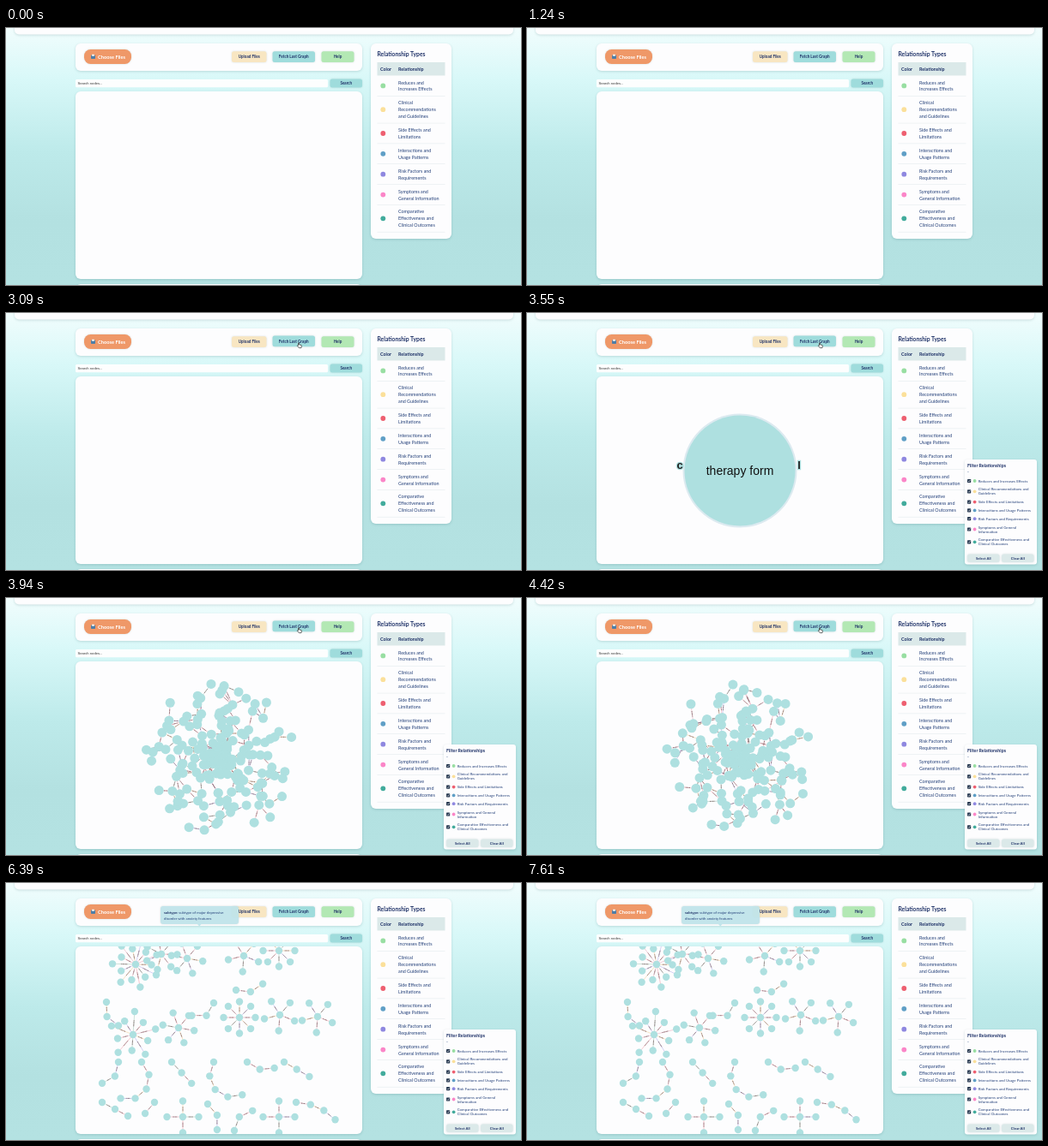
Write an HTML page that moves like this. It is 600 by 300 pixels and loops after 7640 ms.

```html
<!DOCTYPE html>
<html lang="en">
<head>
<meta charset="utf-8">
<title>Therapy graph</title>
<style>
  html, body { margin: 0; width: 100%; height: 100%; overflow: hidden; }
  svg { display: block; font-family: Lato, sans-serif; fill: #24407a; }
  .card { fill: #fdfdfe; filter: drop-shadow(0 1px 1.5px rgba(0, 60, 70, .16)); }
  .button { filter: drop-shadow(0 .5px .8px rgba(0, 60, 70, .15)); }
  .bold { font-weight: 700; fill: #1f3268; }
  .mid { text-anchor: middle; }
  .plain { font-family: "Liberation Sans", Arial, sans-serif; }
</style>
</head>
<body>
<svg id="stage" width="600" height="300" viewBox="0 0 600 300"></svg>
<script>
const LOOP = 7640;
const TEAL = '#aee0e0';
const types = [
  ['#98dea2', ['Reduces and', 'Increases Effects']],
  ['#fbe09a', ['Clinical', 'Recommendations', 'and Guidelines']],
  ['#ee5f70', ['Side Effects and', 'Limitations']],
  ['#5f9fc6', ['Interactions and', 'Usage Patterns']],
  ['#8f88e0', ['Risk Factors and', 'Requirements']],
  ['#fb86c8', ['Symptoms and', 'General Information']],
  ['#42ab9c', ['Comparative', 'Effectiveness and', 'Clinical Outcomes']]
];
const filters = [
  ['Reduces and Increases Effects'],
  ['Clinical Recommendations and', 'Guidelines'],
  ['Side Effects and Limitations'],
  ['Interactions and Usage Patterns'],
  ['Risk Factors and Requirements'],
  ['Symptoms and General', 'Information'],
  ['Comparative Effectiveness and', 'Clinical Outcomes']
];

// Markup helpers; text is placed by the middle of its capitals.
const text = (x, y, size, str, attrs = '') =>
  `<text x="${x}" y="${y + size * .36}" font-size="${size}" ${attrs}>${str}</text>`;
const rect = (x, y, w, h, r, attrs) =>
  `<rect x="${x}" y="${y}" width="${w}" height="${h}" rx="${r}" ${attrs}/>`;
const circle = (x, y, r, fill) => `<circle cx="${x}" cy="${y}" r="${r}" fill="${fill}"/>`;
const card = (x, y, w, h, r) => rect(x, y, w, h, r, 'class="card"');
const button = (x, y, w, h, fill, label, size) =>
  rect(x, y, w, h, 2.5, `class="button" fill="${fill}"`) +
  text(x + w / 2, y + h / 2, size, label, 'class="bold mid"');

function legend() {
  let out = card(425, 18, 94, 228, 6) +
    text(432.5, 30.3, 6.75, 'Relationship Types', 'class="bold"') +
    rect(432.5, 40, 79, 15.5, 0, 'fill="#dbe9e9"') +
    text(436, 47.7, 5.4, 'Color', 'class="bold"') +
    text(457, 47.7, 5.4, 'Relationship', 'class="bold"');
  let y = 55.5;
  for (const [color, lines] of types) {
    const h = 7.85 * lines.length + 8.15;
    out += circle(439.3, y + h / 2, 2.9, color);
    lines.forEach((line, i) => out += text(457, y + 8.1 + i * 7.9, 5.4, line));
    y += h;
    out += rect(432.5, y - .25, 79, .5, 0, 'fill="#dfe6e8"');
  }
  return out;
}

function filterPanel() {
  let out = card(510, 171, 84, 122.5, 3) +
    text(513, 177.9, 5.3, 'Filter Relationships', 'class="bold"') +
    text(513, 185.5, 5, '-');
  let y = 196;
  filters.forEach((lines, i) => {
    const mid = y + (lines.length - 1) * 2.5;
    out += rect(513, mid - 2.1, 4.2, 4.2, .7, 'fill="#24364e"') +
      `<path d="M514 ${mid}l.9 1 1.5-2" stroke="#fff" stroke-width=".6" fill="none"/>` +
      circle(521.6, mid, 1.9, types[i][0]);
    lines.forEach((line, k) => out += text(525.7, y + k * 5, 4.4, line));
    y += lines.length > 1 ? 14.8 : 9.8;
  });
  return out + button(513, 281.5, 37.5, 9.5, '#dbe9e9', 'Select All', 4.3) +
    button(553, 281.5, 37.5, 9.5, '#dbe9e9', 'Clear All', 4.3);
}

function seeded(seed) {
  return () => (seed = seed * 16807 % 2147483647) / 2147483647;
}
const polar = ([x, y], r, degrees) => {
  const a = degrees * Math.PI / 180;
  return [x + r * Math.cos(a), y + r * Math.sin(a)];
};

// An edge is a faint line with a tiny label in its middle.
const edgeColors = ['#ea7183', '#d9829b', '#e9b765', '#8f88e0', '#7fb39a'];
function edge([ax, ay], [bx, by], i) {
  const at = k => `${(ax + (bx - ax) * k).toFixed(1)} ${(ay + (by - ay) * k).toFixed(1)}`;
  return `<path d="M${at(0)}L${at(1)}" stroke="${edgeColors[i % 5]}" stroke-width=".5" opacity=".75"/>` +
    `<path d="M${at(.36)}L${at(.64)}" stroke="#7d6062" stroke-width=".9" stroke-dasharray="1 .5"/>`;
}
const drawGraph = (nodes, links, r) =>
  links.map(([a, b], i) => edge(nodes[a], nodes[b], i)).join('') +
  nodes.map(([x, y]) => circle(x.toFixed(2), y.toFixed(2), r, TEAL)).join('');

// Settling cluster: a loose golden-angle spiral, dense in the middle,
// where each node hangs on an inner one.
const random = seeded(91);
const spread = size => (random() - .5) * size;
const CENTER = [249, 187];
const cluster = Array.from({length: 185}, (_, i) => {
  const [x, y] = polar(CENTER, 90 * i / 185 + spread(10), i * 137.5 + spread(50));
  return [CENTER[0] + (x - CENTER[0]) * .95, y];
});
const drift = cluster.map(() => [spread(6), spread(6)]);
const clusterLinks = cluster.slice(1).map(([x, y], n) => {
  const gap = ([px, py]) => Math.abs(Math.hypot(px - x, py - y) - 18);
  const inner = cluster.slice(0, n + 1);
  return [n + 1, inner.reduce((best, p, i) => gap(p) < gap(inner[best]) ? i : best, 0)];
});

function clusterAt(ms) {
  const k = (ms - 3940) / 480;
  const nodes = cluster.map((p, i) =>
    p.map((v, axis) => v + k * (drift[i][axis] - .03 * (v - CENTER[axis]))));
  return drawGraph(nodes, clusterLinks, 5.5);
}

// Packed layout: stars and bending chains.
function packedGraph() {
  const nodes = [], links = [];
  const add = p => nodes.push(p) - 1;

  function star(x, y, leaves) {
    const hub = add([x, y]), first = leaves % 4 ? -50 : 0;
    for (let i = 0; i < leaves; i++) {
      const r = leaves > 8 && i % 2 ? 27 : 18.5;
      links.push([hub, add(polar([x, y], r, first + i * 360 / leaves))]);
    }
  }
  function chain(x, y, length, heading, turn) {
    let p = [x, y];
    for (let i = 0; i < length; i++) {
      const n = add(p);
      if (i) links.push([n - 1, n]);
      p = polar(p, 17, heading + i * turn);
    }
  }

  star(151, 95, 14);
  star(181, 83, 7);
  star(211, 88, 6);
  star(277, 85, 5);
  star(318, 79, 8);
  star(148, 177, 10);
  star(201, 169, 6);
  star(272, 157, 8);
  star(319, 154, 5);
  star(363, 156, 5);
  star(206, 273, 4);
  star(318, 273, 4);

  chain(117, 139, 3, 88, -50);
  chain(242, 140, 3, 120, 60);
  chain(268, 125, 3, 7, -40);
  chain(131, 209, 3, 104, 47);
  chain(158, 209, 5, 60, 40);
  chain(193, 209, 3, 47, 0);
  chain(242, 209, 5, 106, -38);
  chain(281, 209, 3, 30, -35);
  chain(324, 209, 3, 30, 0);
  chain(112, 256, 3, 28, 0);
  chain(173, 256, 2, 130, 0);
  chain(235, 258, 3, 50, 40);
  chain(266, 289, 3, -70, 45);
  chain(338, 256, 4, 9, 15);
  return drawGraph(nodes, links, 4.2);
}

const haloLetter = (s, x) => text(x, 177, 13, s,
  `class="plain mid" font-weight="700" fill="#222" stroke="${TEAL}" stroke-width="2.5" paint-order="stroke"`);
const firstNode = circle(248, 184, 66.5, '#dceaf0') + circle(248, 184, 64.5, TEAL) +
  text(248, 183.5, 14, 'therapy form', 'class="plain mid" fill="#111"') +
  haloLetter('c', 178) + haloLetter('l', 317);

const tooltip = rect(180, 27, 91, 21, 3, 'class="button" fill="#c0e4ea" opacity=".94"') +
  '<path d="M223 48h4.5l-2.25 2.5z" fill="#c0e4ea"/>' +
  text(184, 34.3, 4.25, '<tspan class="bold">subtype:</tspan> subtype of major depressive') +
  text(184, 41.3, 4.25, 'disorder with anxiety features');

const stage = document.getElementById('stage');
stage.innerHTML = `
  <defs>
    <linearGradient id="sky" x2="0" y2="1">
      <stop stop-color="#f1fdfd"/><stop offset=".2" stop-color="#d8f8f8"/>
      <stop offset=".48" stop-color="#bdeaea"/><stop offset=".75" stop-color="#b3e1e1"/>
      <stop offset="1" stop-color="#b4e2e2"/>
    </linearGradient>
    <clipPath id="frame">${rect(81, 74, 334, 219, 6, '')}</clipPath>
  </defs>
  ${rect(0, 0, 600, 300, 0, 'fill="url(#sky)"')}
  ${card(10, -20, 581, 27.5, 5)}
  ${text(308, -2.8, 6.2, 'Manage graph types, apply filters and query therapy pages by exploring groupings', 'class="mid" fill="#444"')}
  ${card(81, 18, 334, 32, 6)}
  ${rect(91, 25, 55, 17, 7.5, 'class="button" fill="#ef9868"')}
  ${rect(99, 31.5, 5, 4.5, .8, 'fill="#4d7ea8"')}${rect(100, 30.8, 3, 2, .3, 'fill="#f4efe6"')}
  ${text(107, 33.5, 5.7, 'Choose Files', 'font-weight="700" fill="#fff"')}
  ${button(263, 27.3, 40.5, 12.7, '#f8e6c2', 'Upload Files', 4.6)}
  <g id="fetch">${button(310.5, 27.3, 49.5, 12.7, '#9fdcdc', 'Fetch Last Graph', 4.65)}</g>
  ${button(367.5, 27.3, 38, 12.7, '#b3e8b4', 'Help', 4.6)}
  ${rect(81, 60, 294, 9.3, 1.5, 'fill="#fdfefe"')}
  ${text(83.5, 64.7, 4.15, 'Search nodes...', 'class="plain" fill="#333"')}
  ${button(377.5, 59.6, 37.5, 9.9, '#9fdcdc', 'Search', 4.6)}
  ${card(81, 74, 334, 219, 6)}
  ${card(81, 299, 334, 20, 6)}
  <g id="graph" clip-path="url(#frame)"></g>
  ${legend()}
  <g id="panel">${filterPanel()}</g>
  <g id="tip">${tooltip}</g>
  <g id="cursor" stroke-linejoin="round">
    <path id="arrow" d="M0 0V5.2L1.2 4.1 2 6 2.9 5.6 2.1 3.8H3.7Z" fill="#111" stroke="#fff" stroke-width=".5"/>
    <path id="hand" d="M0 .5Q.6-.3 1.1.5V2.5L3.6 3Q4.1 3.2 4 4L3.5 6.2H.8L-1.2 3.7Q-1 2.9 0 3.5Z" fill="#fff" stroke="#111" stroke-width=".6"/>
  </g>`;

const el = Object.fromEntries(['fetch', 'graph', 'panel', 'tip', 'cursor', 'arrow', 'hand']
  .map(id => [id, document.getElementById(id)]));
const show = (node, on) => node.setAttribute('visibility', on ? 'visible' : 'hidden');
const packed = packedGraph();

// Cursor stops: time, x, y.
const route = [
  [1100, 400, -8], [2300, 357.5, 41.5], [2700, 340.5, 34.5],
  [4700, 340.5, 34.5], [5150, 416.5, 154], [5450, 416.5, 154], [6150, 225, 82]
];
function cursorAt(ms) {
  let i = 0;
  while (i < route.length - 2 && ms > route[i + 1][0]) i++;
  const [t0, x0, y0] = route[i], [t1, x1, y1] = route[i + 1];
  const k = Math.min(1, Math.max(0, (ms - t0) / (t1 - t0)));
  const e = k * k * (3 - 2 * k);
  return [x0 + (x1 - x0) * e, y0 + (y1 - y0) * e];
}

let shown = '';
function setGraph(markup) {
  if (markup !== shown) el.graph.innerHTML = shown = markup;
}

function draw(ms) {
  setGraph(ms < 3250 ? '' : ms < 3650 ? firstNode : ms < 4720 ? clusterAt(ms) : packed);
  const hover = ms > 2600 && ms < 4750;
  el.fetch.setAttribute('transform', `translate(0 ${hover ? -.7 : 0})`);
  el.cursor.setAttribute('transform', `translate(${cursorAt(ms)})`);
  show(el.arrow, ms > 1100 && ms < 6200 && !hover);
  show(el.hand, hover);
  show(el.panel, ms >= 3250);
  show(el.tip, ms >= 6200);
}

const start = performance.now();
function tick() {
  draw((performance.now() - start) % LOOP);
  requestAnimationFrame(tick);
}
tick();
</script>
</body>
</html>
```
